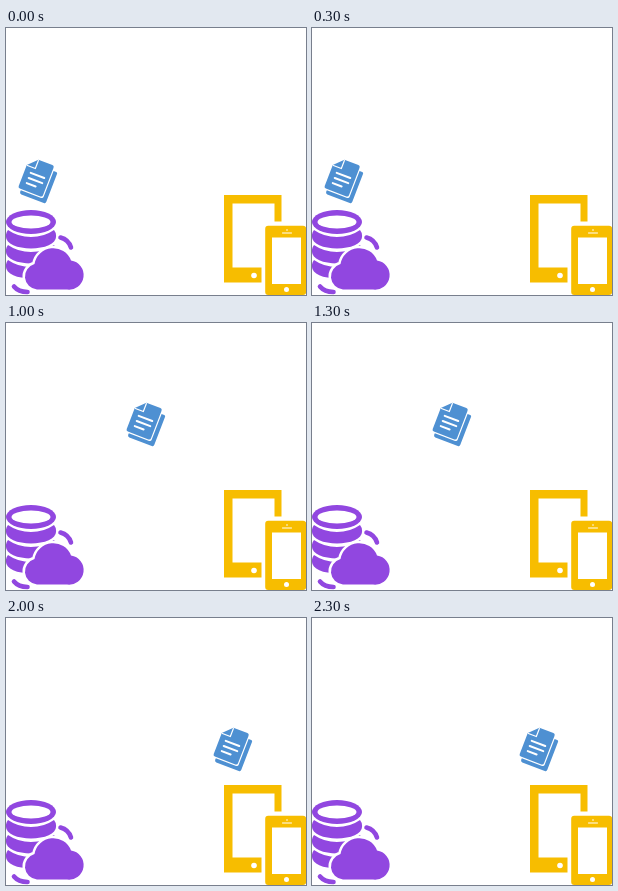
Recreate the animation shown at these times as an HTML page. Size 300 by 267 pixels, loop 2500 ms.

```html
<!DOCTYPE html>
<html lang="en">
<head>
<meta charset="utf-8">
<title>Cloud to devices</title>
<style>
  html, body { margin: 0; width: 100%; height: 100%; overflow: hidden; background: #fff; }
  svg { display: block; width: 100%; height: 100%; }
  .cloud { fill: #9147e0; }
  .devices { fill: #f7bd00; }
  .doc { fill: #4e90d2; }
  .gap { fill: #fff; }
  .line { fill: none; stroke: #fff; stroke-linecap: round; }
  .sync { fill: none; stroke: #9147e0; stroke-width: 4.6; stroke-linecap: round; }
  .puff { stroke: #fff; stroke-width: 5; paint-order: stroke; }
</style>
</head>
<body>
<svg viewBox="0 0 300 267">
  <g class="cloud">
    <ellipse cx="25" cy="194" rx="25" ry="12"/>
    <ellipse class="gap" cx="25" cy="194" rx="19.500" ry="6.500"/>
    <g id="bands"></g>
    <path class="sync" d="M54.500 209.500Q62.500 211.500 65 219.500M8 258.500Q12.500 264 21.500 264"/>
    <path class="puff" d="M31 261.500A13 13 0 0 1 28.500 236A19 19 0 0 1 65 232.500A14.500 14.500 0 0 1 61 261.500Z"/>
  </g>

  <g class="devices">
    <path fill-rule="evenodd" d="M218 167H275.500V254.500H218ZM226.500 175.500V239.500H268.500V175.500Z"/>
    <circle class="gap" cx="248" cy="247.500" r="2.800"/>
    <rect class="gap" x="255.500" y="193.500" width="45" height="74"/>
    <rect x="259.200" y="197.800" width="41" height="69.200" rx="3"/>
    <rect class="gap" x="266" y="209.500" width="29" height="46.500"/>
    <circle class="gap" cx="281" cy="202" r=".8"/>
    <path class="line" d="M276.500 205H285.500" stroke-width="1"/>
    <circle class="gap" cx="280.500" cy="261.500" r="2.500"/>
  </g>

  <g id="doc" class="doc">
    <g transform="translate(12 -3.500) rotate(21)">
      <path d="M27.200 5H30Q31.500 5 31.500 6.500V36.500Q31.500 38.500 29.500 38.500H5.500Q3.500 38.500 3.500 36.500V34.700H25.200Q27.200 34.700 27.200 32.700Z"/>
      <path d="M9 0H24Q26 0 26 2V31.500Q26 33.500 24 33.500H2Q0 33.500 0 31.500V9Z"/>
      <path class="line" d="M9.300 .8V9.300H.8" stroke-width="1.200"/>
      <path class="line" d="M6.500 15H21M6.500 20.500H21M6.500 26H16" stroke-width="2"/>
    </g>
  </g>
</svg>
<script>
  const STEP = 500;
  const stops = [[12, 132], [56, 88], [120, 80], [168, 88], [207, 110]];
  const doc = document.getElementById('doc');

  // Curved slices of the database cylinder
  document.getElementById('bands').innerHTML = [202, 217, 232].map(y =>
    `<path d="M2 ${y}Q12 ${y + 7} 25 ${y + 7}T48 ${y}Q50.500 ${y + 3} 50 ${y + 7}
      A25 11.500 0 0 1 0 ${y + 7}Q-.5 ${y + 3} 2 ${y}Z"/>`
  ).join('');

  function draw() {
    const [x, y] = stops[Math.floor(performance.now() / STEP) % stops.length];
    doc.setAttribute('transform', `translate(${x} ${y})`);
    requestAnimationFrame(draw);
  }
  draw();
</script>
</body>
</html>
```
